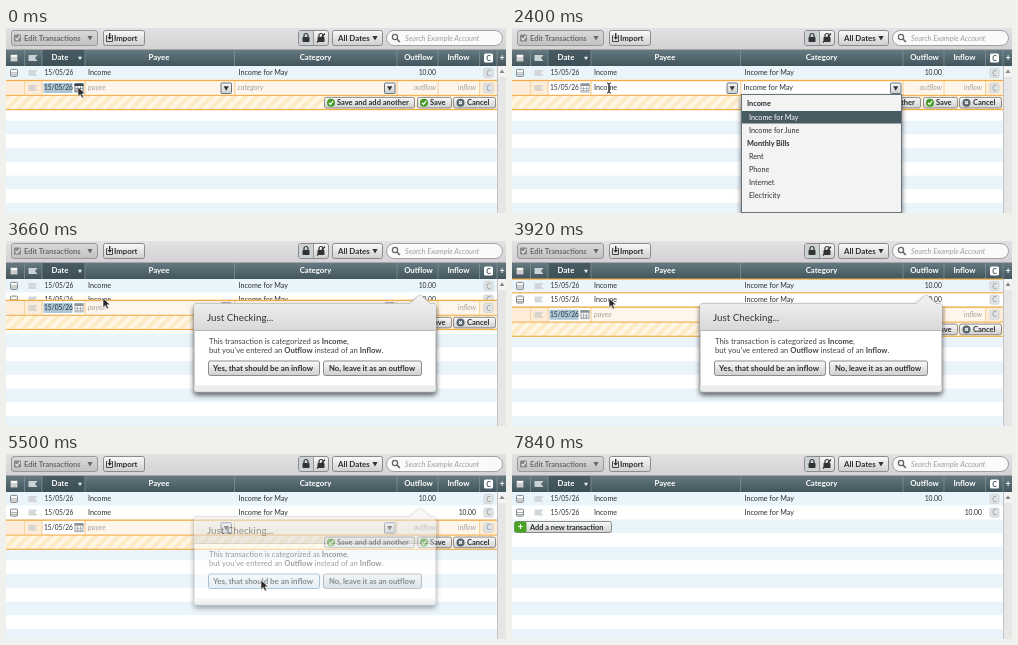
Recreate the animation shown at these times as an HTML page. Size 500 by 185 pixels, loop 8200 ms.

```html
<!DOCTYPE html>
<html lang="en">
<head>
<meta charset="utf-8">
<title>Adding a transaction</title>
<style>
html, body { margin: 0; width: 100%; height: 100%; overflow: hidden; background: #fff; }
svg { display: block; position: absolute; left: 0; top: 0; }
text { font-family: Lato, "Open Sans", sans-serif; white-space: pre; }
</style>
</head>
<body>
<svg width="500" height="185" viewBox="0 0 500 185">
  <defs>
    <linearGradient id="bar" x2="0" y2="1"><stop stop-color="#e3e1e3"/><stop offset="1" stop-color="#d3d1d3"/></linearGradient>
    <linearGradient id="btn" x2="0" y2="1"><stop stop-color="#fafafa"/><stop offset="1" stop-color="#cfcfcf"/></linearGradient>
    <linearGradient id="lit" x2="0" y2="1"><stop stop-color="#fff"/><stop offset="1" stop-color="#e3e8eb"/></linearGradient>
    <linearGradient id="dim" x2="0" y2="1"><stop stop-color="#dadada"/><stop offset="1" stop-color="#c2c2c2"/></linearGradient>
    <linearGradient id="head" x2="0" y2="1"><stop stop-color="#657980"/><stop offset="1" stop-color="#42555c"/></linearGradient>
    <linearGradient id="pop" x2="0" y2="1"><stop stop-color="#f4f4f4"/><stop offset="1" stop-color="#d8d8d8"/></linearGradient>
    <pattern id="hatch" width="8" height="8" patternUnits="userSpaceOnUse" patternTransform="rotate(45)">
      <rect width="8" height="8" fill="#fff6e4"/><rect width="4" height="8" fill="#fdebc8"/>
    </pattern>
    <filter id="shadow" x="-10%" y="-15%" width="120%" height="140%">
      <feDropShadow dx="0" dy="3" stdDeviation="2.5" flood-color="#000" flood-opacity=".6"/>
    </filter>
  </defs>
  <g id="base"></g>
  <g id="live"></g>
</svg>
<script>
const LOOP = 8200, PITCH = 13.7, TOP = 38;
const INK = '#2b2f31', PALE = '#a3a3a3', ORANGE = '#f2ad48';
const pen = document.createElement('canvas').getContext('2d');
const clamp = v => Math.min(1, Math.max(0, v));
const smooth = u => u * u * (3 - 2 * u);

const rect = (x, y, w, h, fill, extra = '') =>
  `<rect x="${x}" y="${y}" width="${w}" height="${h}" fill="${fill}" ${extra}/>`;
const path = (d, fill, extra = '') => `<path d="${d}" fill="${fill}" ${extra}/>`;
const text = (x, y, s, size = 7.2, fill = INK, extra = '') =>
  `<text x="${x}" y="${y}" font-size="${size}" fill="${fill}" ${extra}>${s}</text>`;
const BOLD = 'font-weight="700"', ITALIC = 'font-style="italic"';
const MID = 'text-anchor="middle" ', END = ' text-anchor="end"';
const down = (x, y, fill = '#444', r = 2.6) =>
  path(`M${x - r} ${y - r * .75}h${2 * r}l${-r} ${r * 1.7}z`, fill);
const width = (s, size = 7.2) => {
  pen.font = `${size}px Lato, "Open Sans", sans-serif`;
  return pen.measureText(s).width;
};
const inside = (p, x, y, w, h) => p && p.x >= x && p.x < x + w && p.y >= y && p.y < y + h;

function button(x, y, w, h, label, tx, size, at, icon = '') {
  const hover = inside(at, x, y, w, h);
  return rect(x + .5, y + .5, w - 1, h - 1, hover ? 'url(#lit)' : 'url(#btn)',
      `rx="2" stroke="${hover ? '#6497b4' : '#8b8b8b'}"`) +
    icon + text(tx, y + h / 2 + size * .35, label, size, INK, BOLD);
}

const flag = (x, y, fill) => path(`M${x} ${y - 3}h9l-2.5 3l2.5 3h-9z`, fill);
const page = (x, y) => rect(x, y - 3.5, 7, 7, '#f8f8f8', 'rx="1" stroke="#84898c"') +
  path(`M${x} ${y}h7M${x} ${y + 2}h7`, 'none', 'stroke="#8d9396" stroke-width=".8"');
const badge = (x, y) => rect(x, y - 4.5, 9, 9, '#e2e5e6', 'rx="1.5" stroke="#c3c8ca" stroke-width=".7"') +
  text(x + 4.5, y + 2.6, 'C', 7, '#9ba2a5', MID + BOLD);

function toolbar() {
  let s = rect(0, 0, 500, 22, 'url(#bar)') + rect(0, 21, 500, 1, '#a5a5a5');
  s += rect(5.5, 2.5, 86, 15, 'url(#dim)', 'rx="2.5" stroke="#999"') +
    rect(8, 6.5, 7, 7, '#888', 'rx="1"') +
    path('M9.5 10l1.7 1.8 2.8-4', 'none', 'stroke="#eee" stroke-width="1.2"') +
    text(18, 12.8, 'Edit Transactions', 7.5, '#6b6b6b', BOLD) + down(84, 10, '#666');
  s += button(97, 2, 42, 16, 'Import', 108, 7.8, null,
    path('M101.5 7.5h-1v6h6v-6h-1', 'none', 'stroke="#444"') + path('M103 5h1.4v4h1.6l-2.3 2.7-2.3-2.7h1.6z', '#333'));
  s += rect(292.5, 2.5, 30, 15, 'url(#btn)', 'rx="2.5" stroke="#8b8b8b"') +
    rect(293, 3, 14.5, 14, '#cdd2d5', 'rx="2"') + path('M307.5 3v14', 'none', 'stroke="#999"');
  for (const x of [296.5, 311.5])
    s += rect(x, 9, 7, 5, '#333', 'rx=".8"') +
      path(`M${x + 1.5} 9v-1.5a2 2 0 0 1 4 0v1.5`, 'none', 'stroke="#333" stroke-width="1.2"');
  s += path('M311 14.5l8-9', 'none', 'stroke="#333" stroke-width="1.2"');
  s += button(326, 2, 51, 16, 'All Dates', 332, 7.9, null, down(369, 10, '#333'));
  return s + rect(380.5, 2.5, 116, 15, '#fafafa', 'rx="7.5" stroke="#a2a2a2"') +
    '<circle cx="389" cy="9" r="2.6" fill="none" stroke="#666" stroke-width="1.3"/>' +
    path('M391 11l2.8 3', 'none', 'stroke="#666" stroke-width="1.6"') +
    text(399, 12.7, 'Search Example Account', 7.3, '#a0a0a0', ITALIC);
}

function sheet() {
  let s = '';
  for (let i = 0; i < 11; i++)
    s += rect(0, TOP + i * PITCH, 491, PITCH, i % 2 ? '#fff' : '#e9f4fb');
  s += rect(0, 22, 500, 16, 'url(#head)') + rect(36, 22, 43, 16, '#394c53', 'opacity=".65"');
  for (const x of [18.5, 36, 79, 228.5, 391, 432, 473.5, 491])
    s += path(`M${x} 22v16`, 'none', 'stroke="#7f9198" stroke-width=".8"');
  const titles = { Date: 54, Payee: 153, Category: 309.5, Outflow: 412.5, Inflow: 452.5 };
  for (const k in titles) s += text(titles[k], 32.4, k, 7.8, '#fff', MID + BOLD);
  s += page(4.5, 30) + flag(22.5, 30, '#c9d2d5') + down(74, 30.3, '#e8eef0', 2) +
    rect(478, 25.5, 9, 9, '#fff', 'rx="1.5"') + text(482.5, 32.7, 'C', 7, '#42555c', MID + BOLD) +
    text(496, 33, '+', 9, '#fff', MID + BOLD);
  return s + rect(491, 38, 9, 147, '#e6e6e6') + rect(491, 38, 1, 147, '#c2c2c2') +
    rect(492, 38, 8, 11, '#f4f4f4') + path('M493.5 45h5l-2.5-3.5z', '#888');
}

function entry(i, amountX) {
  const y = TOP + 6.9 + i * PITCH, b = y + 2.5;
  return page(4.5, y) + flag(22.5, y, '#d3d7d9') + text(38.5, b, '15/05/26', 6.6) +
    text(82, b, 'Income') + text(232.5, b, 'Income for May') +
    text(amountX, b, '10.00', 6.8, INK, END) + badge(478, y);
}

// A combo field: typed part, then its completion shown as selected.
function field(x, b, hint, value, typed) {
  if (!value) return text(x, b, hint, 7.2, PALE, ITALIC);
  const from = width(value.slice(0, typed)), all = width(value);
  return (typed < value.length ? rect(x + from, b - 7, all - from, 9.5, '#a9c8da') : '') + text(x, b, value);
}

function calendar(x, y, hover) {
  const edge = hover ? '#36444b' : '#8a9296';
  return rect(x + .5, y + .5, 8, 8, '#fff', `stroke="${edge}" stroke-width=".8"`) + rect(x, y, 9, 2.5, edge) +
    path(`M${x + 1} ${y + 5}h7M${x + 1} ${y + 7}h7M${x + 3} ${y + 3}v5M${x + 6} ${y + 3}v5`,
      'none', `stroke="${edge}" stroke-width=".6"`);
}

function editor(shift, st, at) {
  const y = TOP + .7 + PITCH + shift, c = y + 7.6, b = c + 2.4;
  let s = rect(0, y, 491, 15, '#fdecd8') + rect(0, y + 15, 491, 14, 'url(#hatch)') +
    rect(37, y + 1, 41, 13, '#fff');
  const boxes = [[80, 148, st.payee], [230, 160, st.category], [392, 40, st.outflow], [433, 40, '']];
  for (const [x, w, value] of boxes) s += rect(x, y + 1, w, 13, value ? '#fff' : '#fef6ea');
  for (const x of [18.5, 36, 79, 228.5, 391, 432, 473.5])
    s += path(`M${x} ${y}v15`, 'none', 'stroke="#f3cf94" stroke-width=".8"');
  s += rect(0, y - .6, 491, 1.3, ORANGE) + rect(0, y + 14.5, 491, 1, ORANGE) + rect(0, y + 28.6, 491, 1.2, ORANGE);
  if (st.dateOn) s += rect(37.5, c - 5, 29, 10, '#a9c5d6');
  s += flag(22.5, c, '#d9d5ce') + text(38, b, '15/05/26', 6.6) +
    calendar(68.5, c - 4.5, at.x < 79 && Math.abs(at.y - c) < 6);
  s += field(82, b, 'payee', st.payee, st.payeeTyped) + field(231.5, b, st.categoryHint, st.category, st.categoryTyped);
  for (const x of [215, 378.5])
    s += rect(x, c - 5, 10.5, 10.5, 'url(#btn)', 'rx="1" stroke="#68777d"') + down(x + 5.2, c + .3, '#333');
  s += st.outflow ? text(430, b, st.outflow, 6.8, INK, END) : text(430, b, 'outflow', 7.2, PALE, ITALIC + END);
  s += text(470, b, 'inflow', 7.2, PALE, ITALIC + END) + badge(478, c);

  const by = y + 16.5, my = by + 5.8;
  const ok = x => `<circle cx="${x}" cy="${my}" r="4" fill="#3f9a22"/>` +
    path(`M${x - 2} ${my}l1.5 1.8 2.7-3.6`, 'none', 'stroke="#fff" stroke-width="1.2"');
  const no = `<circle cx="454.5" cy="${my}" r="4" fill="#55646b"/>` +
    path(`M453 ${my - 1.5}l3 3m0-3l-3 3`, 'none', 'stroke="#fff" stroke-width="1.1"');
  return s + button(318, by, 91, 11.6, 'Save and add another', 331, 7.5, at, ok(325)) +
    button(411, by, 35, 11.6, 'Save', 424, 7.5, at, ok(418)) +
    button(447, by, 43, 11.6, 'Cancel', 461, 7.5, at, no);
}

const panel = (x, w, h) => rect(x + .5, 66.5, w, h, '#f3f3f3', 'stroke="#65747a" filter="url(#shadow)"');

function payeeMenu() {
  return panel(79, 147, 45) + text(84, 78, 'Memorized Payees', 7.3, INK, BOLD) +
    rect(80, 83, 146.5, 12.5, '#485a62') + text(86, 91.8, 'Income', 7.2, '#fff') +
    button(83, 97, 60, 12, 'Edit Payees', 99, 7.2, null,
      path('M91 105.5l.7-2 4-4 1.4 1.4-4 4z', '#d58b35'));
}

function categoryMenu() {
  const s = panel(229, 160, 118) + text(235, 78, 'Income', 7.3, INK, BOLD) +
    rect(230, 83, 159, 12.5, '#485a62') + text(237, 91.8, 'Income for May', 7.2, '#fff') +
    text(237, 104.5, 'Income for June');
  return s + text(235, 118, 'Monthly Bills', 7.3, INK, BOLD) +
    ['Rent', 'Phone', 'Internet', 'Electricity'].map((k, i) => text(237, 131 + i * 13, k)).join('');
}

function popover(alpha, at) {
  const top = 'M191 62.5H404l10-8.5 10 8.5h3a3 3 0 0 1 3 3';
  return `<g opacity="${alpha}">` +
    path(top + 'V148a3 3 0 0 1-3 3H191a3 3 0 0 1-3-3V65.5a3 3 0 0 1 3-3z', '#fff',
      'stroke="#8a8a8a" stroke-width=".8" filter="url(#shadow)"') +
    path(top + 'V89.5H188V65.5a3 3 0 0 1 3-3z', 'url(#pop)') +
    rect(188.5, 89, 241, 1, '#b8b8b8') + rect(188.5, 144.5, 241, 6, '#ededed') +
    text(201, 80, 'Just Checking...', 9.8, '#333') +
    text(203, 102.6, `This transaction is categorized as <tspan ${BOLD}>Income</tspan>,`, 7.7, '#444') +
    text(203, 111.6, `but you've entered an <tspan ${BOLD}>Outflow</tspan> instead of an <tspan ${BOLD}>Inflow</tspan>.`, 7.7, '#444') +
    button(202, 119.5, 112, 15.5, 'Yes, that should be an inflow', 207, 7.9, at) +
    button(317, 119.5, 99, 15.5, 'No, leave it as an outflow', 323, 7.7, at) + '</g>';
}

const stops = [[0, 72, 59], [340, 97, 57], [4240, 97, 57], [5040, 255, 126],
  [5920, 255, 126], [6680, 375, 87], [6800, 470, 87], [7000, 470, 87]];
function pointer(t) {
  if (t >= 7000) {
    const u = smooth(clamp((t - 7000) / 860)), v = 1 - u;
    return { x: 470 * v * v + 600 * u * v + 128 * u * u, y: 87 * v * v + 520 * u * v + 26 * u * u };
  }
  const i = stops.findIndex(s => s[0] > t), [t0, x0, y0] = stops[i - 1], [t1, x1, y1] = stops[i];
  const u = smooth((t - t0) / (t1 - t0));
  return { x: x0 + (x1 - x0) * u, y: y0 + (y1 - y0) * u };
}

function cursor({ x, y }, beam) {
  if (!beam) return path(`M${x} ${y}v9.5l2.3-2.1 1.5 3.6 1.8-.8-1.5-3.4h3.1z`, '#2a2a2a', 'stroke="#fff" stroke-width=".6"');
  const d = `M${x - 2} ${y - 2}q2 0 2 1.5v7q0 1.5-2 1.5M${x + 2} ${y - 2}q-2 0-2 1.5v7q0 1.5 2 1.5`;
  return path(d, 'none', 'stroke="#fff" stroke-width="2"') + path(d, 'none', 'stroke="#222" stroke-width="1"');
}

function scene(t) {
  const at = pointer(t), reset = t >= 3400, shift = PITCH * smooth(clamp((t - 3460) / 400));
  const typed = (start, step, max) => t < start || reset ? 0 : Math.min(max, 1 + Math.floor((t - start) / step));
  const st = { payeeTyped: typed(960, 130, 6), categoryTyped: typed(1820, 42, 14) };
  st.payee = st.payeeTyped ? 'Income' : '';
  st.category = st.categoryTyped ? 'Income for May' : '';
  st.categoryHint = reset ? '' : 'category';
  st.outflow = t < 2980 || reset ? '' : '10'.slice(0, t < 3080 ? 1 : 2);
  st.dateOn = t < 640 || (reset && t < 5100);

  let s = entry(0, 430);
  if (shift) s += entry(1, t < 5240 ? 430 : 470);
  if (t > 3700 && t < 5240)
    s += rect(0, TOP - .5, 491, 1.2, ORANGE) + rect(0, TOP + PITCH - .5, 491, 1.2, ORANGE);
  if (t < 6800) s += editor(shift, st, at);
  else s += rect(2.5, 67.5, 97, 11, 'url(#btn)', 'rx="2" stroke="#8b8b8b"') +
    rect(2.5, 67.5, 12, 11, '#4ba325', 'rx="2"') + text(8.5, 76.3, '+', 10, '#fff', MID + BOLD) +
    text(18, 75.6, 'Add a new transaction', 7.4, INK, BOLD);
  if (t >= 960 && t < 1740) s += payeeMenu();
  if (t >= 1740 && t < 2440) s += categoryMenu();
  const alpha = clamp((t - 3400) / 260) * clamp((5640 - t) / 270);
  if (alpha) s += popover(alpha, at);
  if (t < 7840) s += cursor(at, !reset && at.x > 80);
  return s;
}

const live = document.getElementById('live');
document.getElementById('base').innerHTML = sheet() + toolbar();
const start = performance.now();
function frame(now) {
  live.innerHTML = scene(Math.max(0, now - start) % LOOP);
  requestAnimationFrame(frame);
}
frame(start);
</script>
</body>
</html>
```
